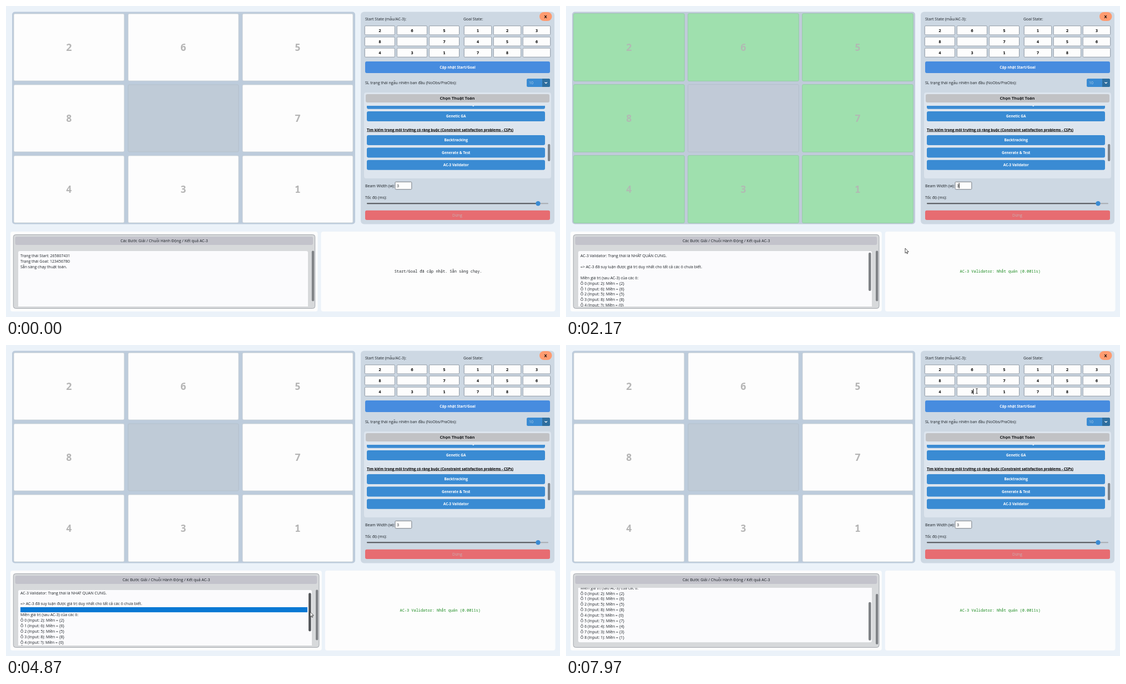
These frames come from a looping animation (998 px wide and 561 px high, 8 s). An HTML page:

```html
<!DOCTYPE html>
<html lang="vi">
<head>
<meta charset="utf-8">
<title>8-puzzle solver</title>
<style>
  html, body { margin: 0; width: 100%; height: 100%; overflow: hidden; background: #ebf2f9; }
  svg { display: block; width: 100vw; height: 100vh; }
  text { font-family: "Open Sans", "Noto Sans", sans-serif; font-size: 7px; fill: #1c2126; white-space: pre; }
  .b { font-weight: 700; font-size: 6.5px; }
  .mono { font-family: "Noto Sans Mono", "DejaVu Sans Mono", monospace; font-size: 6.93px; }
  .digit { font-family: "Noto Sans Mono", "DejaVu Sans Mono", monospace; font-weight: 700; font-size: 18px; }
  .cell { font-family: "Noto Sans Mono", "DejaVu Sans Mono", monospace; font-weight: 700; font-size: 7.4px; fill: #000; }
</style>
</head>
<body>
<svg id="stage" viewBox="0 0 998 561"></svg>
<script>
const LOOP = 8000;
const RESULT = 1920, FLASH_END = 2900;   // result appears, green flash ends
const SELECT = 3650, GRAB = 4800, RELEASE = 5700;
const WHEEL = 6100, CLICK = 7600;
const BLUE = '#3a8bd3';

const box = (x, y, x2, y2, r, fill, extra = '') =>
  `<rect x="${x}" y="${y}" width="${x2 - x}" height="${y2 - y}" rx="${r}" fill="${fill}" ${extra}/>`;
const txt = (s, x, y, cls = '', extra = '') =>
  `<text x="${x}" y="${y}" class="${cls}" ${extra}>${s.replace(/&/g, '&amp;').replace(/</g, '&lt;')}</text>`;
const mid = (s, x, y, cls, fill = '#1c2126', size = '') =>
  txt(s, x, y, cls, `text-anchor="middle" style="fill:${fill};${size && `font-size:${size}px`}"`);
const stroke = (c, w = 1) => `stroke="${c}" stroke-width="${w}"`;

const START = '265807431', GOAL = '123456780';
const shown = d => d === '0' ? '' : d;

function board(green) {
  let out = box(11, 10.5, 629, 393.5, 5, green ? '#c0cbda' : '#bdccdc');
  [...START].forEach((d, i) => {
    const x = 14 + 206 * (i % 3), y = 14 + 128 * Math.floor(i / 3);
    const fill = d === '0' ? (green ? '#c1cad7' : '#bfcbd7') : green ? '#9fe0ae' : '#fdfdfd';
    const edge = d === '0' ? '#b2bdc8' : green ? '#92c7a3' : '#c6cdd2';
    const grow = green ? 0.4 : 0;
    out += box(x - grow, y - grow, x + 199 + grow, y + 121 + grow, 2, fill, stroke(edge, 0.8));
    out += mid(shown(d), x + 99.5, y + 66.6, 'digit', green ? '#b1bab3' : '#b5b5b5');
  });
  return out;
}

function cells(state, x0, pitch, w) {
  return [...state].map((d, i) => {
    const x = x0 + pitch * (i % 3), y = 35.8 + 20.1 * Math.floor(i / 3);
    return box(x, y, x + w, y + 16.2, 1.5, '#fdfdfd', stroke('#8b96a2')) +
      mid(shown(d), x + w / 2, y + 10.7, 'cell', '#000');
  }).join('');
}

function button(label, y) {
  return box(650, y, 971, y + 18, 3, BLUE) + mid(label, 810.7, y + 11.3, 'b', '#fff');
}

function controls() {
  return box(639, 10.5, 988, 393.5, 6, '#cdd8e3') +
    txt('Start State (mẫu/AC-3):', 647, 25.5) + txt('Goal State:', 824, 25.5) +
    box(961, 11, 983.5, 27, 8, '#ff9b70') + mid('X', 972, 21.8, 'b', '#000', 7.6) +
    cells(START, 646.3, 58, 54.2) + cells(GOAL, 825.2, 53, 49.5) +
    box(647, 100, 980, 121, 3, '#478cdf') + mid('Cập nhật Start/Goal', 813.5, 112.8, 'b', '#fff') +
    txt('SL trạng thái ngẫu nhiên ban đầu (NoObs/PraObs):', 647, 140.8) +
    box(938, 131, 980, 146, 2.5, BLUE) + txt('10', 942, 141, '', 'style="fill:#b5cfe4"') +
    '<path d="M966 131h11.500q2.500 0 2.500 2.500v10q0 2.500-2.500 2.500H966z" fill="#2f6f9f"/>' +
    '<path d="M970.500 137.500l2.200 2 2.200-2" fill="none" stroke="#fff" stroke-width="1.200"/>' +
    box(645, 156, 982, 311, 4, '#dde5ee') +
    box(648, 159, 979, 174, 3, '#c1c2c5') + mid('Chọn Thuật Toán', 813, 169.3, 'b', '#15181b', 7.5) +
    '<g clip-path="url(#list)">' + button('', 167.7) + box(840.5, 179, 843, 181, 0.8, '#fff') + '</g>' +
    button('Genetic GA', 190) +
    txt('Tìm kiếm trong môi trường có ràng buộc (Constraint satisfaction problems - CSPs)',
      650, 225.5, 'b', 'text-decoration="underline" style="fill:#000"') +
    button('Backtracking', 233) + button('Generate & Test', 255.4) + button('AC-3 Validator', 277.8) +
    box(976, 249, 980.3, 280, 2, '#7e848b') +
    txt('Beam Width (w):', 647, 326.5) +
    box(701, 317.3, 730.8, 330.8, 1.5, '#fdfdfd', stroke('#777d84')) + txt('3', 704, 326.6) +
    txt('Tốc độ (ms):', 647, 347.5) +
    box(650, 355.2, 977, 357.2, 1, '#a9adb2') + box(650, 355.2, 958, 357.2, 1, '#575b60') +
    `<circle cx="958.500" cy="356.200" r="4.200" fill="${BLUE}"/>` +
    box(647, 368.8, 980, 386, 3, '#e76c71') + mid('Dừng', 813, 380, '', '#c7b1b4');
}

const lines = ['AC-3 Validator: Trạng thái là NHẤT QUÁN CUNG.', '',
  '=> AC-3 đã suy luận được giá trị duy nhất cho tất cả các ô chưa biết.', '',
  'Miền giá trị (sau AC-3) của các ô:',
  ...[...START].map((d, i) => `Ô ${i} (Input: ${shown(d) || '?'}): Miền = {${d}}`)];
const ready = [`Trạng thái Start: ${START}`, `Trạng thái Goal: ${GOAL}`, 'Sẵn sàng chạy thuật toán.'];
const PITCH = 9.875;
const para = list => list.map((s, i) => txt(s, 26, 453.3 + PITCH * i)).join('');

// Lower panels; the left one is dx wider once a result is shown.
function lower(dx, content, message, color) {
  return box(8, 407, 561.5 + dx, 551, 4, '#fdfdfd') +
    box(567.5 + dx, 407, 989.5, 551, 4, '#fdfdfd') +
    box(13.3, 412.5, 556.7 + dx, 545.5, 4, '#d7d9db', stroke('#a2a6ac')) +
    box(16.5, 416, 553 + dx, 431, 3, '#c3c3cb') +
    mid('Các Bước Giải / Chuỗi Hành Động / Kết quả AC-3', 285 + dx / 2, 426, '', '#1c2126', 7.05) +
    `<g clip-path="url(#view)">${content}</g>` +
    mid(message, 778.6 + dx / 2, 481.2, 'mono', color);
}

const page = (w, content) => box(22, 442, w, 546, 3, '#fbfbfd') + content;
const outerBar = (x, id = '') => box(x, 441.5, x + 4.3, 532.5, 2, '#7f8286', id);

const before = lower(0, page(544, para(ready)), 'Start/Goal đã cập nhật. Sẵn sàng chạy.', '#22262a') +
  outerBar(550.8);
const after = lower(7.3,
  '<g id="outer">' + page(551, `<g clip-path="url(#page)"><g id="inner">
    ${box(26, 476.6, 543, 485.8, 0, '#0878d4', 'id="sel"')}${para(lines)}</g></g>`) +
  box(545, 444.8, 549.6, 514, 2.2, '#7f8286', 'id="bar"') + '</g>',
  'AC-3 Validator: Nhất quán (0.0011s)', '#17891c') + outerBar(558, 'id="outerBar"');

stage.innerHTML = `<defs>
    <clipPath id="list">${box(645, 180, 982, 311, 0, '#000')}</clipPath>
    <clipPath id="view">${box(13, 438, 570, 542, 0, '#000')}</clipPath>
    <clipPath id="page">${box(22, 445, 551, 544, 0, '#000')}</clipPath>
  </defs>
  <g id="white">${board(false)}</g><g id="green">${board(true)}</g>
  ${controls()}
  <g id="before">${before}</g><g id="after">${after}</g>
  ${box(707.6, 319.3, 708.6, 328.8, 0, '#000', 'id="beamCaret"')}
  ${box(733.3, 79, 734.3, 89, 0, '#000', 'id="cellCaret"')}
  <g id="arrow"><path d="M0 0V8.800L2 7 3.300 10 4.700 9.400 3.400 6.500H6.200Z" fill="#fff" stroke="#222" stroke-width="0.800"/></g>
  <g id="beam"><path d="M-1.800-4.300H-.5L0-4 .5-4.300H1.800M0-4V4M-1.800 4.300H-.5L0 4 .5 4.300H1.800" fill="none" stroke="#222" stroke-width="0.900"/></g>`;

const el = Object.fromEntries([...stage.querySelectorAll('[id]')].map(e => [e.id, e]));

// Pointer path: time, x, y
const path = [
  [0, 860, 575], [350, 860, 575], [800, 818, 300], [1130, 801.5, 252], [1380, 806, 284],
  [1560, 806, 284], [1900, 722, 362], [2170, 611, 437], [2500, 570, 455], [2950, 547, 467],
  [3470, 544, 470], [SELECT, 544, 480], [3950, 543, 488], [4350, 546, 484], [4650, 548, 479],
  [GRAB, 548, 479], [5400, 548, 500], [5640, 548, 507.7], [RELEASE, 548, 507.7],
  [6000, 515, 490], [6250, 490, 483], [6570, 490, 483], [6700, 670, 340],
  [7050, 712, 180], [7450, 740, 83], [LOOP, 740, 83]];

function pointer(t) {
  const i = Math.max(1, path.findIndex(p => p[0] > t));
  const [a, b] = [path[i - 1], path[i]];
  const k = (t - a[0]) / (b[0] - a[0]), e = k * k * (3 - 2 * k);
  const u = i > 15 && i < 19 ? k : e;
  return [a[1] + (b[1] - a[1]) * u, a[2] + (b[2] - a[2]) * u];
}

const within = (x, y, x1, y1, x2, y2) => x > x1 && x < x2 && y > y1 && y < y2;
const show = (e, on) => e.setAttribute('display', on ? 'inline' : 'none');
const move = (e, x, y) => e.setAttribute('transform', `translate(${x} ${y})`);
const blink = (t, from) => t >= from && (t - from) % 1060 < 530;

function draw(t) {
  const done = t >= RESULT, flash = done && t < FLASH_END;
  show(el.white, !flash);
  show(el.green, flash);
  show(el.before, !done);
  show(el.after, done);

  const [x, y] = pointer(t);
  const drag = t < GRAB ? 0 : t < RELEASE ? Math.min(28.7, y - 479) : 28.7;
  const wheel = Math.min(1, Math.max(0, (t - WHEEL) / 80));
  move(el.inner, 0, -drag * 1.476);
  move(el.bar, 0, drag);
  move(el.outer, 0, -9.7 * wheel);
  move(el.outerBar, 0, 7.4 * wheel);
  el.bar.setAttribute('fill', t >= GRAB && t < RELEASE ? '#55585c' : '#7f8286');
  show(el.sel, t >= SELECT + 150);

  show(el.beamCaret, t < SELECT && blink(t, RESULT));
  show(el.cellCaret, blink(t, CLICK));

  const text = done && within(x, y, 22, 442, 546, 541) || within(x, y, 646, 75, 817, 93);
  show(el.arrow, !text);
  show(el.beam, text);
  move(text ? el.beam : el.arrow, x, y);
}

function tick() {
  draw(performance.now() % LOOP);
  requestAnimationFrame(tick);
}
tick();
</script>
</body>
</html>
```
